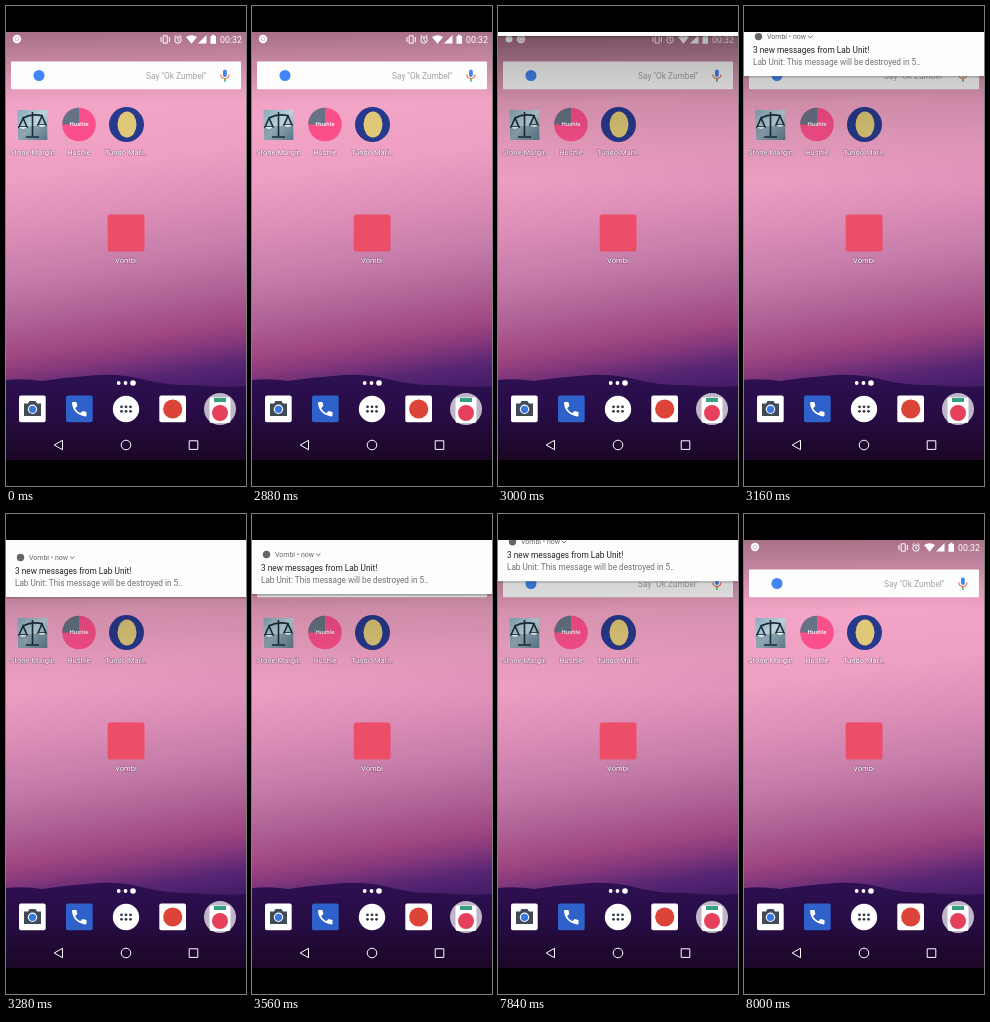
Write an HTML page that moves like this. It is 240 by 480 pixels and loops after 8040 ms.

```html
<!DOCTYPE html>
<html lang="en">
<head>
<meta charset="utf-8">
<title>Home screen notification</title>
<style>
html, body { margin: 0; width: 100%; height: 100%; overflow: hidden; background: #000; }
svg { display: block; width: 100%; height: 100%; font-family: Roboto, "Noto Sans", sans-serif; }
.label { fill: #fff; font-size: 7.6px; text-anchor: middle; paint-order: stroke; stroke: #402040; stroke-opacity: .35; stroke-width: 1.2px; }
.line { fill: none; stroke: #fff; stroke-width: 1; }
.white { fill: #fff; }
</style>
</head>
<body>
<svg viewBox="0 0 240 480">
  <defs>
    <linearGradient id="sky" gradientUnits="userSpaceOnUse" x1="90" y1="26" x2="146" y2="390">
      <stop offset="0" stop-color="#e99dbd"/>
      <stop offset=".2" stop-color="#f2a5c6"/>
      <stop offset=".36" stop-color="#ee9fc3"/>
      <stop offset=".5" stop-color="#dc8eb7"/>
      <stop offset=".64" stop-color="#c47ba9"/>
      <stop offset=".74" stop-color="#b06396"/>
      <stop offset=".84" stop-color="#9f4680"/>
      <stop offset=".89" stop-color="#83377b"/>
      <stop offset=".95" stop-color="#572573"/>
      <stop offset="1" stop-color="#461d68"/>
    </linearGradient>
    <linearGradient id="hill" x2="0" y2="1">
      <stop offset="0" stop-color="#2d1052"/>
      <stop offset=".4" stop-color="#280d47"/>
      <stop offset="1" stop-color="#1b0625"/>
    </linearGradient>
    <linearGradient id="shade" x2="0" y2="1">
      <stop offset="0" stop-opacity=".3"/>
      <stop offset=".35" stop-opacity=".18"/>
      <stop offset="1" stop-opacity="0"/>
    </linearGradient>
    <linearGradient id="topShade" x2="0" y2="1">
      <stop offset="0" stop-opacity=".28"/>
      <stop offset="1" stop-opacity="0"/>
    </linearGradient>
    <linearGradient id="stone" x2="1" y2="1">
      <stop offset="0" stop-color="#86a9ba"/>
      <stop offset=".5" stop-color="#bdd3dc"/>
      <stop offset="1" stop-color="#6b8a9c"/>
    </linearGradient>
    <clipPath id="screen"><path d="M0 26H240V454H0z"/></clipPath>
  </defs>
  <rect width="240" height="480"/>
  <g clip-path="url(#screen)">
    <rect y="26" width="240" height="428" fill="url(#sky)"/>
    <rect y="26" width="240" height="70" fill="url(#topShade)"/>
    <path fill="url(#hill)" d="M0 374Q18 372 36 375Q64 371 92 369Q118 368 140 374Q164 380 188 379Q214 382 240 380V454H0z"/>

    <g id="status">
      <circle id="badge" class="white" cx="11" cy="33" r="3.5"/>
      <g id="recorder">
        <circle class="white" cx="11" cy="33" r="4.2"/>
        <circle cx="11" cy="33" r="2" fill="none" stroke="#d3a0b6" stroke-width=".7"/>
      </g>
      <path class="line" d="M157.2 29.8h4v7.4h-4zM155 31v5M163.4 31v5"/>
      <circle class="line" cx="172" cy="34" r="3.2"/>
      <path class="line" d="M172 32v2.3l1.4 1M168.3 31l2-1.800M175.700 31l-2-1.800"/>
      <path class="white" d="M180 31Q185.500 27.500 191 31L185.500 37.800zM192 37.500L200.500 29V37.500zM204.500 30h1.500v-1.200h2.500V30h1.500v7.800h-5.500z"/>
      <text class="white" x="214" y="36.500" font-size="8.800">00:32</text>
    </g>

    <rect x="5" y="55.500" width="230" height="27.800" rx="1" fill="#fdfdfd"/>
    <circle cx="33" cy="69.500" r="5.500" fill="#4285f4"/>
    <text x="140" y="72.700" font-size="8.300" fill="#a3a3a3">Say "Ok Zumbel"</text>
    <rect x="217" y="63.500" width="3.800" height="7.500" rx="1.900" fill="#4285f4"/>
    <path d="M214.800 68.500a4.100 4.100 0 0 0 8.200 0" fill="none" stroke="#ed7445" stroke-width="1.300"/>
    <path d="M218.900 73v2.800" stroke="#34a853" stroke-width="1.400"/>

    <rect x="11.500" y="104" width="30" height="30" fill="url(#stone)"/>
    <path d="M12 120H41V134H12z" fill="#385464" opacity=".35"/>
    <path d="M26.500 106V130M17 112Q26 107 37 110M17 112l-4 9h8zM36 110l-4 9h8zM20 131h13" fill="none" stroke="#192c38" stroke-width="1.600"/>
    <path d="M13 121q4 4 8 0zM32 119q4 4 8 0z" fill="#e5eef0"/>
    <circle cx="73" cy="118.500" r="16.800" fill="#fb4f8b"/>
    <path d="M73 118.500H56.200A16.800 16.800 0 0 1 73 101.700z" fill="#667386"/>
    <text class="white" x="73" y="120.400" font-size="6" font-weight="500" text-anchor="middle">Hushle</text>
    <circle cx="120.500" cy="118.500" r="17.500" fill="#27398d"/>
    <ellipse cx="121" cy="118.500" rx="9.500" ry="13" fill="#dfc878"/>
    <text class="label" x="26.500" y="149">Stone Margin</text>
    <text class="label" x="73" y="149">Hushle</text>
    <text class="label" x="120" y="149">Tundo Marl..</text>

    <rect x="101.700" y="208.500" width="36.800" height="37" rx="2.500" fill="#ec4e67"/>
    <text class="label" x="120" y="257">Vombi</text>

    <g class="white">
      <circle cx="112.700" cy="377" r="1.900"/><circle cx="119.500" cy="377" r="1.900"/><circle cx="127" cy="377" r="2.800"/>
      <rect x="13" y="389.500" width="26.700" height="26.700" rx="2"/>
      <rect x="153.300" y="389.500" width="26.700" height="26.700" rx="2"/>
      <circle cx="120" cy="403" r="13.200"/>
      <circle cx="214" cy="403" r="16" opacity=".7"/>
      <rect x="203.500" y="391.500" width="21" height="25.500" rx="2"/>
    </g>
    <path fill="#414b58" d="M18 397.500h4l1.500-2.500h6l1.500 2.500h4V410H18z"/>
    <circle cx="26.500" cy="403.300" r="4.700" fill="#fff"/>
    <circle cx="26.500" cy="403.300" r="3.600" fill="#3978de"/>
    <rect x="60" y="389.500" width="26.700" height="26.700" rx="2" fill="#2e61c9"/>
    <path class="white" d="M67 396h3.400l1 4-2.300 2.200q2 3.600 5.100 5.100l2.300-2.300 4 1v3.400q0 1-1.200 1Q67 408.500 66 397q0-1 1-1z"/>
    <g id="apps" fill="#333b42"></g>
    <circle cx="166.700" cy="403" r="9.600" fill="#db4437"/>
    <rect x="208" y="392" width="12" height="4" fill="#35a080"/>
    <circle cx="214" cy="407" r="8" fill="#e5405c"/>
    <path class="line" d="M56.500 434.300V443.700L48.200 439zM183.200 434.800h8.600v8.600h-8.600z"/>
    <circle class="line" cx="120" cy="439" r="4.800"/>

    <rect id="scrim" y="26" width="240" height="150" fill="url(#shade)"/>
    <g id="card">
      <rect y="10" width="240" height="72" opacity=".1"/>
      <rect y="10" width="240" height="71" opacity=".14"/>
      <rect y="10" width="240" height="70" fill="#fdfdfd"/>
      <circle cx="14.500" cy="40.500" r="3.700" fill="#666"/>
      <text x="23" y="43" font-size="7" fill="#666">Vombi • now</text>
      <path d="M64 39.500l2.200 2.200 2.200-2.200" fill="none" stroke="#666"/>
      <text x="9" y="57" font-size="8.300" fill="#222">3 new messages from Lab Unit!</text>
      <text x="9" y="68.800" font-size="8.200" fill="#707070">Lab Unit: This message will be destroyed in 5..</text>
    </g>
  </g>
</svg>
<script>
const LOOP = 8040, HIDDEN = -56, OVERSHOOT = 3;
const byId = id => document.getElementById(id);
const card = byId('card'), scrim = byId('scrim'), badge = byId('badge'), recorder = byId('recorder');
const progress = (t, from, to) => Math.min(1, Math.max(0, (t - from) / (to - from)));
const inOut = p => p < .5 ? 2 * p * p : 1 - 2 * (1 - p) ** 2;
const mix = (a, b, p) => a + (b - a) * p;

byId('apps').innerHTML = Array.from({ length: 6 }, (_, i) =>
  `<circle cx="${115.5 + i % 3 * 4.5}" cy="${400.8 + Math.floor(i / 3) * 4.5}" r="1.4"/>`).join('');

function cardOffset(t) {
  if (t < 3280) return mix(HIDDEN, OVERSHOOT, inOut(progress(t, 2920, 3280)));
  if (t < 7760) return mix(OVERSHOOT, 0, inOut(progress(t, 3280, 3560)));
  return mix(0, HIDDEN, inOut(progress(t, 7760, 8000)));
}

function render(t) {
  const notified = t >= 2960 && t < 8000;
  card.setAttribute('transform', `translate(0 ${cardOffset(t).toFixed(2)})`);
  card.setAttribute('visibility', t > 2920 && t < 8000 ? 'visible' : 'hidden');
  scrim.setAttribute('opacity', progress(t, 2880, 3000) * (1 - progress(t, 7800, 8000)));
  badge.setAttribute('visibility', notified ? 'visible' : 'hidden');
  recorder.setAttribute('transform', `translate(${notified ? 12 : 0} 0)`);
}

const start = performance.now();
function tick() {
  render((performance.now() - start) % LOOP);
  requestAnimationFrame(tick);
}
tick();
</script>
</body>
</html>
```
